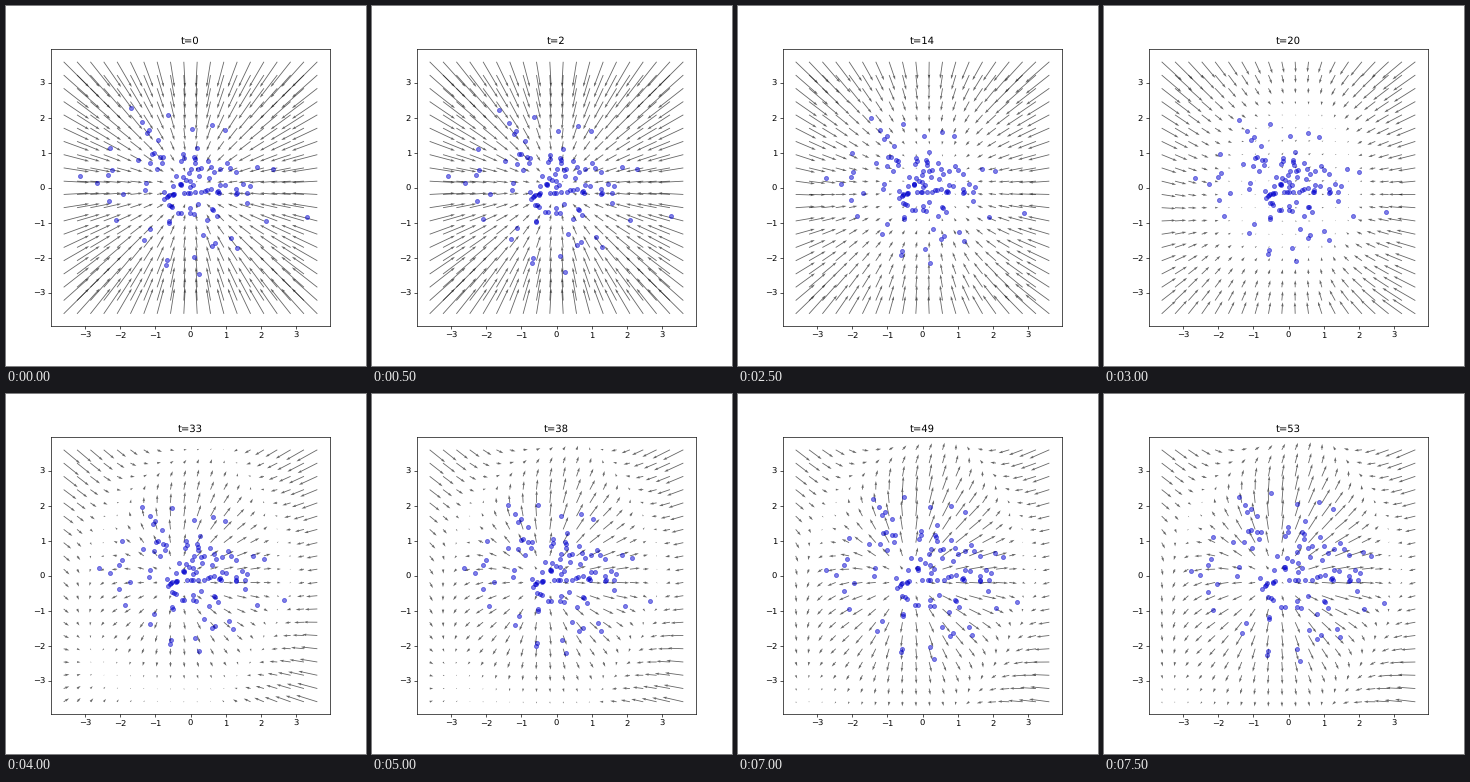
Recreate the animation shown at these times as a matplotlib script. Size 360 px wide and 360 px high, loop 8000 ms.

```python
import numpy as np
import matplotlib.pyplot as plt
from matplotlib.animation import FuncAnimation

plt.rcParams['text.hinting'] = 'none'

LIM = 3.6
STEPS = [0, 2, 3, 5, 9, 14, 20, 27, 33, 36, 38, 40, 42, 46, 49, 53]
RATE = 0.011

# The far stragglers of the cloud; the rest is a seeded normal sample
STRAGGLERS = [(-3.14, .34), (-2.66, .14), (-2.33, .36), (-2.24, .51),
              (-1.92, -.18), (-2.12, -.92), (-1.68, 2.27), (-1.38, 1.88),
              (-1.24, 1.57), (-.64, 2.08), (-.70, -2.20), (.24, -2.45),
              (.09, -1.98), (1.32, -1.72), (.70, -1.57), (3.31, -.83),
              (2.14, -.95), (2.34, .54), (1.90, .60), (.99, 1.66)]


def outflow(x, y):
    """Late flow: a source near the centre, held in by left and right walls."""
    gain = 1.9 * np.exp(-((x + 0.2)**2 + (y - 0.2)**2) / 2.6**2)
    left = 0.4 * np.maximum(0, -1.3 * x + 0.7 * y - 1.7)
    right = np.maximum(0, x + 0.35 * np.abs(y) - 1.9)
    u = gain * (x + 0.35) + left - right
    v = gain * (y + 0.1) - 0.8 * left - 0.08 * (y + 2) * right
    return u, v


def field(x, y, t):
    """Pure contraction at first, turning smoothly into the outflow."""
    mix = 1 - np.exp(-(t / 26)**2)
    u, v = outflow(x, y)
    return mix * u - (1 - mix) * x, mix * v - (1 - mix) * y


rng = np.random.default_rng(4)
cloud = rng.normal((0, -0.05), (0.78, 0.76), (95, 2))
path = [np.vstack([STRAGGLERS, cloud])]
for t in range(STEPS[-1]):
    p = path[-1]
    path.append(p + RATE * np.stack(field(*p.T, t + 0.5), axis=1))

axis = np.linspace(-LIM, LIM, 20)
gx, gy = np.meshgrid(axis, axis)

fig, ax = plt.subplots(figsize=(6, 6), dpi=60)
ax.set(xlim=(-1.1 * LIM, 1.1 * LIM), ylim=(-1.1 * LIM, 1.1 * LIM),
       xticks=range(-3, 4), yticks=range(-3, 4))
arrows = ax.quiver(gx, gy, *field(gx, gy, 0), angles='xy', scale_units='xy',
                   scale=5, width=0.003, color='black', alpha=0.6)
dots = ax.scatter(*path[0].T, s=24, color='mediumblue', alpha=0.5)
title = ax.set_title('t=0')


def update(i):
    t = STEPS[i]
    arrows.set_UVC(*field(gx, gy, t))
    dots.set_offsets(path[t])
    title.set_text(f't={t}')
    return arrows, dots, title


anim = FuncAnimation(fig, update, frames=len(STEPS), interval=500,
                     repeat=True, repeat_delay=0)
plt.show()
```
